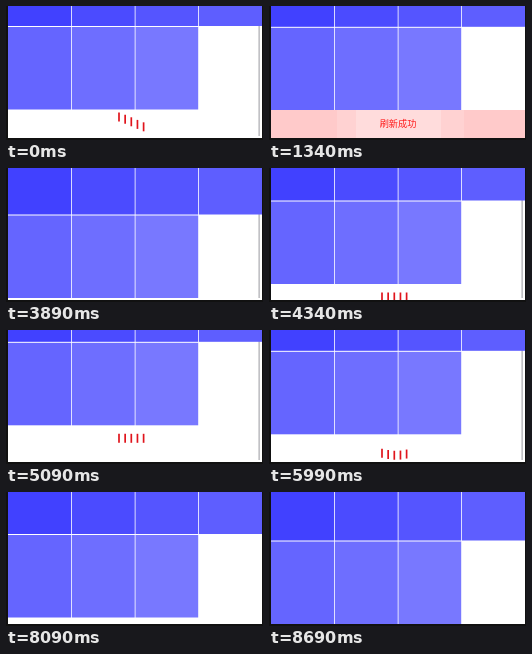
Recreate the animation shown at these times as an HTML page. Size 257x134 px, loop 9.44 s.

```html
<!DOCTYPE html>
<html lang="zh">
<head>
<meta charset="utf-8">
<title>Pull to refresh</title>
<style>
html, body { margin: 0; width: 100%; height: 100%; overflow: hidden; background: #111; }
svg { display: block; width: 100%; height: 100%; }
text { font: 9.2px "Noto Sans CJK SC", "Noto Sans CJK", sans-serif; fill: #ff1a1a; text-anchor: middle; }
</style>
</head>
<body>
<svg viewBox="0 0 257 134">
  <defs><clipPath id="view"><path d="M2 0H256V132H2Z"/></clipPath></defs>
  <rect width="257" height="134" fill="#111"/>
  <g clip-path="url(#view)">
    <rect width="257" height="134" fill="#fff"/>
    <rect id="scroll" x="252.6" y="0" width="1" height="130" fill="#99999f"/>
    <g id="grid"></g>
    <g id="loader" stroke="#e0141c" stroke-width="1.7"></g>
    <g id="notice">
      <g id="bars"></g>
      <text x="129" y="121.4">刷新成功</text>
    </g>
  </g>
</svg>
<script>
const LOOP = 9440, STEP = 150, ROW = 83;
const $ = id => document.getElementById(id);

function add(parent, tag, attrs) {
  const el = document.createElementNS('http://www.w3.org/2000/svg', tag);
  for (const key in attrs) el.setAttribute(key, attrs[key]);
  return parent.appendChild(el);
}

// Cells hang around y = 0, the gap between the two rows.
const columns = [2, 66, 129.5, 193, 256];
const shades = [['#4141ff', '#4b4bff', '#5555ff', '#5e5eff'], ['#6565ff', '#6e6eff', '#7878ff']];
shades.forEach((row, r) => row.forEach((fill, c) => add($('grid'), 'rect', {
  x: columns[c], y: r ? 0.5 : -ROW - 0.5,
  width: columns[c + 1] - columns[c] - (c < 3 ? 0.8 : 0), height: ROW - (r ? 0.5 : 0), fill
})));

const ticks = [0, 1, 2, 3, 4].map(i =>
  add($('loader'), 'line', { x1: 113 + i * 6.15, x2: 113 + i * 6.15, y1: -4.5, y2: 4.5 }));

// The notice opens outward in three layers.
const bars = [[2, 254, '#ffcaca'], [68, 127, '#ffd2d2'], [87, 85, '#ffdcdc']].map(([x, width, fill]) =>
  add($('bars'), 'rect', { x, y: 104, width, height: 28, fill }));

// [step, row gap y]
const track = [[0, 20.5], [1, 21.3], [17, 21.3], [18, 42.5], [19, 49], [25, 49], [26, 47],
  [29, 33], [32, 18], [34, 12.3], [35, 12.3], [37, 21.3], [53, 21.3], [54, 42.5], [55, 49], [63, 49]];

function gapAt(n) {
  const k = Math.max(1, track.findIndex(p => p[0] >= n));
  const [a, y0] = track[k - 1], [b, y1] = track[k];
  return y0 + (y1 - y0) * (n - a) / (b - a);
}

const within = (n, a, b) => n >= a && n < b;
const show = (el, on) => el.setAttribute('visibility', on ? 'visible' : 'hidden');

function render(t) {
  const n = Math.floor((t < 1190 ? t : t + 10) / STEP);
  const gap = gapAt(n);
  $('grid').setAttribute('transform', `translate(0 ${gap})`);
  show($('scroll'), within(n, 0, 6) || within(n, 26, 42));

  const waving = n < 7 || within(n, 36, 43);
  const phase = (n < 7 ? n : n - 36) * STEP * Math.PI * 2 / 800;
  show($('loader'), n < 7 || within(n, 26, 43));
  ticks.forEach((el, i) => {
    const lift = waving ? 8 * Math.sin(0.33 * i - 0.75 - phase) : 0;
    el.setAttribute('transform', `translate(0 ${gap + ROW + 13 + lift})`);
  });

  const open = within(n, 7, 18) ? n - 7 : within(n, 43, 54) ? n - 43 : -1;
  $('notice').setAttribute('display', open < 0 ? 'none' : 'inline');
  bars.forEach((el, i) => el.setAttribute('display', open >= 2 - i ? 'inline' : 'none'));
}

const start = performance.now();
function frame() {
  render((performance.now() - start) % LOOP);
  requestAnimationFrame(frame);
}
frame();
</script>
</body>
</html>
```
